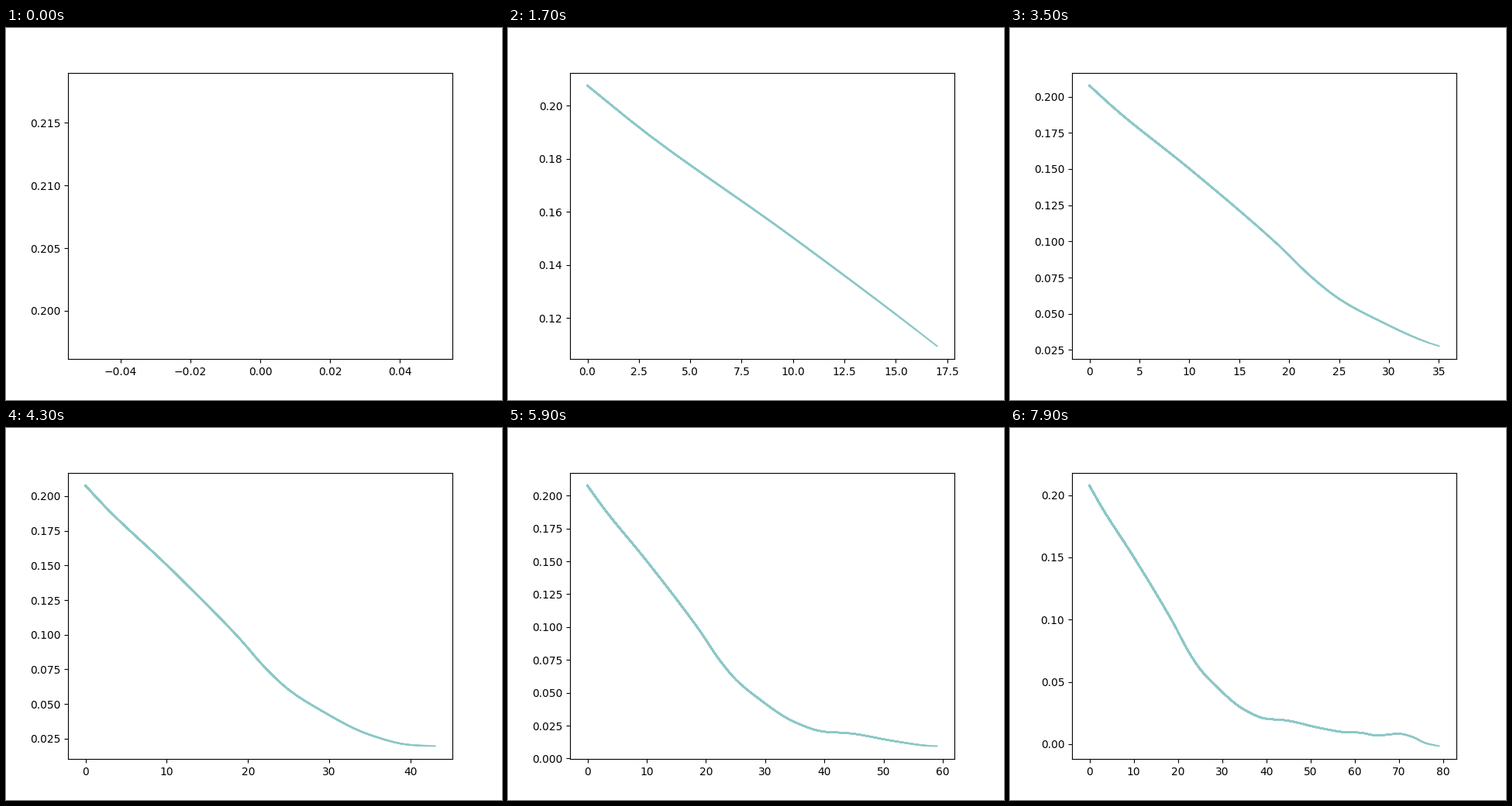
Recreate the animation shown at these times as a matplotlib script. Size 640 by 480 pixels, loop 8000 ms.

```python
import matplotlib.pyplot as plt
import numpy as np
from matplotlib.animation import FuncAnimation

STEPS = 80
COLOR = "#8cc8c8"

# Key points of the loss curve: (step, loss in units of 1e-4)
KEYS = [
    (0, 2075.7), (3, 1889), (10, 1502.8), (19, 970), (22, 768), (25, 603),
    (28, 487), (35, 277), (40, 204), (44, 193), (52, 131), (58, 96),
    (61, 93), (65, 70), (70, 84), (73, 59), (76, 8), (79, -15),
]


def smooth(x, kx, ky):
    """Cubic Hermite curve through the keys, level at each turning point."""
    h = np.diff(kx)
    rise = np.diff(ky) / h
    a, b = rise[:-1], rise[1:]
    inner = np.where(a * b > 0, 2 * a * b / (a + b), 0)
    slope = np.concatenate([rise[:1], inner, rise[-1:]])
    i = np.clip(np.searchsorted(kx, x, side="right") - 1, 0, len(h) - 1)
    t = (x - kx[i]) / h[i]
    s = t * t * (3 - 2 * t)
    bend = t * (1 - t) * (slope[i] * (1 - t) - slope[i + 1] * t)
    return ky[i] * (1 - s) + ky[i + 1] * s + h[i] * bend


steps = np.arange(STEPS)
kx, ky = np.array(KEYS, dtype=float).T
loss = smooth(steps, kx, ky) / 10000

fig, ax = plt.subplots(figsize=(6.4, 4.8), dpi=100)


def update(step):
    ax.clear()
    # Every step lays a new curve over the earlier ones, so older parts look bolder
    for n in range(1, step + 2):
        ax.plot(steps[:n], loss[:n], color=COLOR, lw=1.5)
    return ax.lines


anim = FuncAnimation(fig, update, frames=STEPS, interval=100,
                     repeat=True, repeat_delay=0, blit=False)
plt.show()
```
